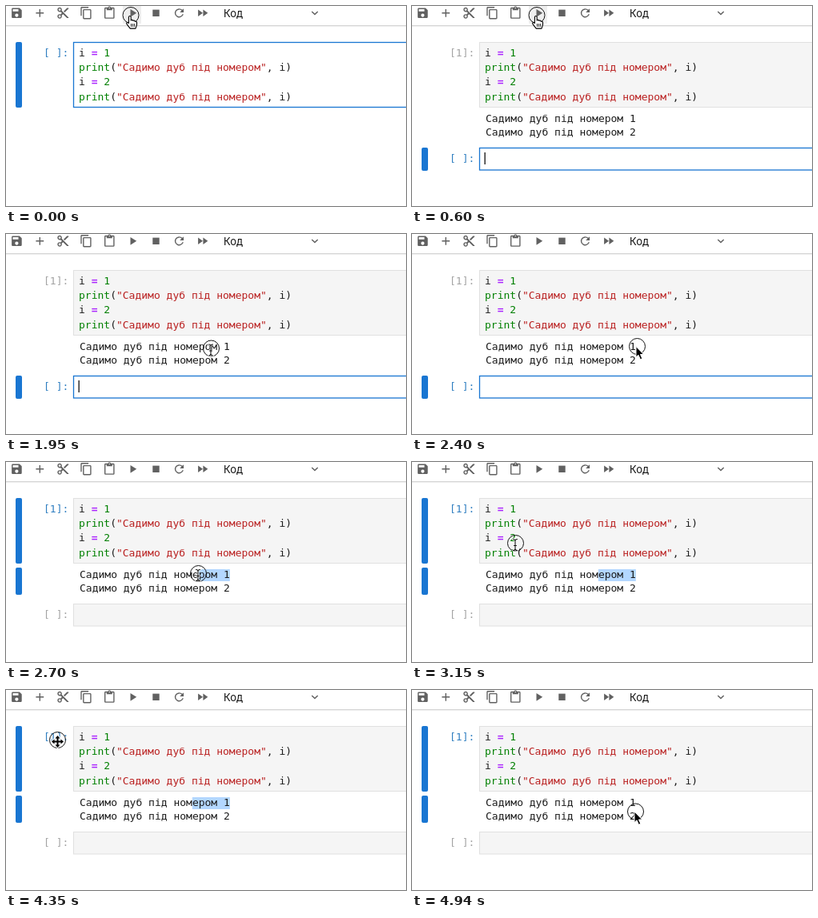
An HTML page that plays this animation: 500x250 px, repeating every 4960 ms.

```html
<!DOCTYPE html>
<html lang="uk">
<head>
<meta charset="utf-8">
<style>
  html, body { margin: 0; width: 100%; height: 100%; overflow: hidden; background: #fff; }
  svg { display: block; }
  text { font: 13px "DejaVu Sans Mono", monospace; fill: #1c1c1c; white-space: pre; }
  .menu { font: 13px Inter, sans-serif; fill: #111; }
  .key { fill: #008000; }
  .op { fill: #a2f; font-weight: bold; }
  .str { fill: #ba2121; }
  .bar { fill: #1976d2; }
  #icons { fill: #616161; }
  #cursor > g { stroke-linejoin: round; stroke-linecap: round; }
</style>
</head>
<body>
<svg width="500" height="250" viewBox="0 0 500 250">
  <rect y="24" width="500" height="1" fill="#d4d4d4"/>
  <rect y="25" width="500" height="1" fill="#f0f0f0"/>
  <rect id="hover" x="146" y="-2" width="23" height="24" fill="#eee"/>
  <g id="icons"></g>
  <text class="menu" x="272" y="14">Код</text>

  <rect id="bar1" class="bar" x="12" y="45" width="8" height="82" rx="2"/>
  <rect id="barOut" class="bar" x="12" y="132" width="8" height="34" rx="2"/>
  <rect id="bar2" class="bar" x="12" y="177" width="8" height="29" rx="2"/>
  <rect id="cell1" x="84.5" y="45.5" width="430" height="81"/>
  <text id="prompt1" x="47" y="63"></text>
  <g id="code"></g>

  <g id="output">
    <rect id="selection" y="134" height="15" fill="#b3d7ff"/>
    <text x="92" y="145">Садимо дуб під номером 1</text>
    <text x="92" y="162">Садимо дуб під номером 2</text>
    <rect id="cell2" x="84.5" y="177.5" width="430" height="27.5"/>
    <text id="prompt2" x="47" y="195">[ ]:</text>
    <rect id="caret" x="90.5" y="183" width="1.3" height="15" fill="#111"/>
  </g>

  <g id="cursor">
    <circle r="10" fill="none" stroke="#111"/>
    <g id="hand" fill="#fff" stroke="#000" stroke-width="1.1">
      <path d="M-2.6 10V2.4Q-2.4 1-1.2 1T.2 2.4V6.6Q.5 5.8 1.5 5.9T2.7 7Q3.2 6.4 4.1 6.6T5.2 7.8Q7.5 7.3 7.5 9.4V12L6 16.6H-.8L-4.8 11.4Q-5.8 9.9-4.8 9.3T-2.6 10Z"/>
      <path d="M.5 11v3M2.6 11v3M4.7 11v3" stroke-width=".9"/>
    </g>
    <path id="arrow" d="M-1.5 0V13.6L1.5 10.8 3.9 16.3 6.3 15.2 4 10H8.2Z" fill="#000" stroke="#fff"/>
    <g id="beam" fill="none">
      <path d="M-3-5Q-.5-5-.5-3V7Q-.5 9-3 9M2-5Q-.5-5-.5-3V7Q-.5 9 2 9M-2 3H1" stroke="#fff" stroke-width="2.6"/>
      <path d="M-3-5Q-.5-5-.5-3V7Q-.5 9-3 9M2-5Q-.5-5-.5-3V7Q-.5 9 2 9M-2 3H1" stroke="#111" stroke-width="1.1"/>
    </g>
    <path id="move" transform="translate(0 2)" stroke="#fff" stroke-width="2" paint-order="stroke" fill="#000"
      d="M0-7.5 3-4H1V-1H4V-3L7.5 0 4 3V1H1V4H3L0 7.5-3 4H-1V1H-4V3L-7.5 0-4-3V-1H-1V-4H-3Z"/>
  </g>
</svg>
<script>
const $ = id => document.getElementById(id);
const show = (id, on) => $(id).style.display = on ? "" : "none";
const LOOP = 4960, CHAR = 7.826, BLUE = "#1976d2", GREY = "#a3a3a3";

// Toolbar icons: centre x and outline on a 24-unit grid
const icons = [
  [13.4, "M17 3H5c-1.11 0-2 .9-2 2v14c0 1.1.89 2 2 2h14c1.1 0 2-.9 2-2V7l-4-4zm-5 16c-1.66 0-3-1.34-3-3s1.34-3 3-3 3 1.34 3 3-1.34 3-3 3zm3-10H5V5h10v4z"],
  [42.3, "M19 13h-6v6h-2v-6H5v-2h6V5h2v6h6v2z"],
  [71.3, "M9.64 7.64A4 4 0 1 0 7.64 9.64L10 12l-2.36 2.36A4 4 0 1 0 9.64 16.36L12 14l7 7h3v-1zM6 8a2 2 0 1 1 0-4 2 2 0 0 1 0 4zm0 12a2 2 0 1 1 0-4 2 2 0 0 1 0 4zM19 3l-6 6 2 2 7-7V3z"],
  [100.3, "M16 1H4c-1.1 0-2 .9-2 2v14h2V3h12V1zm3 4H8c-1.1 0-2 .9-2 2v14c0 1.1.9 2 2 2h11c1.1 0 2-.9 2-2V7c0-1.1-.9-2-2-2zm0 16H8V7h11v14z"],
  [129.3, "M19 2h-4.18a3 3 0 0 0-5.64 0H5c-1.1 0-2 .9-2 2v16c0 1.1.9 2 2 2h14c1.1 0 2-.9 2-2V4c0-1.1-.9-2-2-2zm-7 0a1 1 0 1 1 0 2 1 1 0 0 1 0-2zm7 18H5V4h2v3h10V4h2v16z"],
  [158.3, "M8 5v14l11-7z"],
  [187.5, "M6 6h12v12H6z"],
  [216.5, "M17.65 6.35A8 8 0 1 0 19.73 14h-2.08A6 6 0 1 1 16.22 7.78L13 11h7V4z"],
  [245.7, "M4 18l8.5-6L4 6v12zm9-12v12l8.5-6L13 6z"],
  [386, "M7.41 8.59L12 13.17l4.59-4.58L18 10l-6 6-6-6z"]
];
$("icons").innerHTML = icons.map(([x, d]) =>
  `<path transform="translate(${x - 8.4} .4) scale(.7)" d="${d}"/>`).join("");

const span = (cls, s) => `<tspan class="${cls}">${s}</tspan>`;
const assign = n => `i ${span("op", "=")} ${span("key", n)}`;
const print = span("key", "print") + "(" + span("str", '"Садимо дуб під номером"') + ", i)";
$("code").innerHTML = [assign(1), print, assign(2), print].map((line, k) =>
  `<text x="91" y="${63 + Math.round(18.2 * k)}">${line}</text>`).join("");

// Pointer steps: start time, circle centre, shape
const steps = [
  [0, 156, 11.5, "hand"], [1650, 156.5, 15.5, "hand"], [1800, 183, 101.5, "beam"],
  [1950, 256.5, 143, "beam"], [2100, 270.5, 143, "beam"], [2250, 273.5, 142.5, "beam"],
  [2400, 281.5, 140.5, "arrow"], [2550, 276.5, 140.5, "beam"], [2700, 240.5, 139.5, "beam"],
  [2850, 230.5, 138.5, "beam"], [3000, 219.5, 136.5, "beam"], [3150, 129.5, 101.5, "beam"],
  [3300, 73.5, 70.5, "move"], [3450, 59.5, 64.5, "move"], [3600, 59.5, 63.5, "move"],
  [3900, 59.5, 56.5, "move"], [4350, 64.5, 62.5, "move"], [4500, 156.5, 127.5, "beam"],
  [4640, 207.5, 147.5, "arrow"], [4790, 239.5, 147.5, "arrow"], [4940, 279.5, 152, "arrow"]
];

function paintCell(n, active, editing) {
  const cell = $("cell" + n);
  cell.setAttribute("fill", editing ? "#fff" : "#f5f5f5");
  cell.setAttribute("stroke", editing ? BLUE : "#e0e0e0");
  cell.setAttribute("stroke-width", editing ? 1.3 : 1);
  $("prompt" + n).style.fill = active ? "#307fc1" : GREY;
  show("bar" + n, active);
}

function draw(t) {
  const ran = t >= 600, picked = t >= 2550;
  paintCell(1, !ran || picked, !ran);
  paintCell(2, ran && !picked, ran && !picked);
  $("prompt1").textContent = ran ? "[1]:" : "[ ]:";
  show("output", ran);
  show("barOut", picked);
  show("hover", t < 1800);
  show("caret", ran && t < 2400 && Math.floor(t / 600) % 2 === 1);

  const from = t < 2700 ? 23 : t < 2850 ? 19 : 18;
  show("selection", picked && t < 4940);
  $("selection").setAttribute("x", 92 + from * CHAR);
  $("selection").setAttribute("width", (24 - from) * CHAR);

  const [, x, y, shape] = steps.findLast(s => s[0] <= t);
  $("cursor").setAttribute("transform", `translate(${x} ${y})`);
  for (const id of ["hand", "arrow", "beam", "move"]) show(id, id === shape);
}

const start = performance.now();
function tick() {
  draw((performance.now() - start) % LOOP);
  requestAnimationFrame(tick);
}
tick();
</script>
</body>
</html>
```
